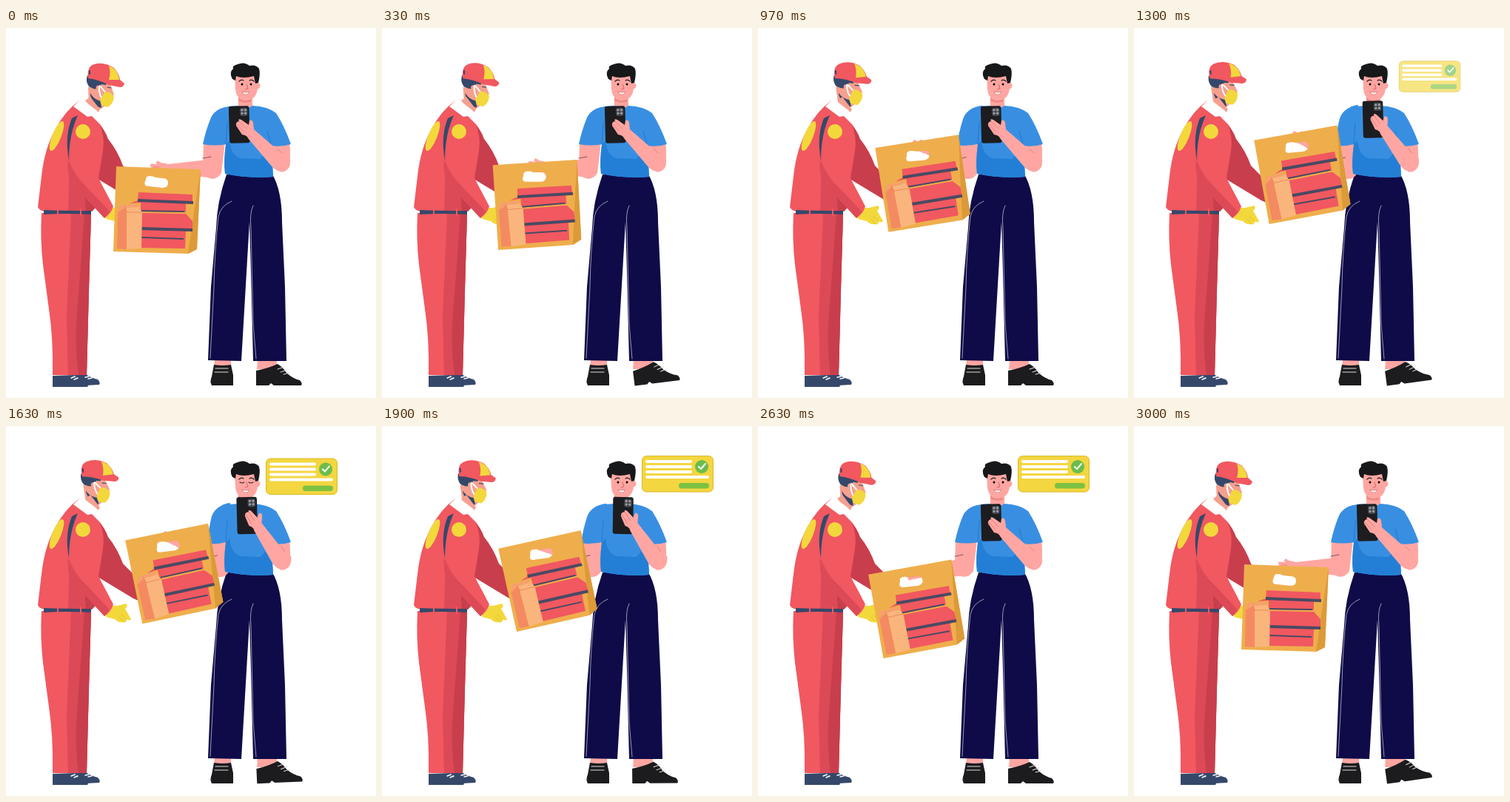
Animation, 500 px wide and 500 px high, one loop 3030 ms. Source, as an HTML page:

```html
<!DOCTYPE html>
<html lang="en">
<head>
<meta charset="utf-8">
<title>Parcel hand-over</title>
<style>
html, body { margin: 0; width: 100%; height: 100%; overflow: hidden; background: #fff; }
svg { display: block; width: 100vw; height: 100vh; }
.red { fill: #f15860; } .mid { fill: #dc4a57; } .deep { fill: #c83e4c; } .navy { fill: #35486a; }
.gold { fill: #f3d83c; } .skin { fill: #ffa6a2; } .face { fill: #f6a08f; } .shirt { fill: #388fe2; }
.pants { fill: #0f0b48; } .black { fill: #1c1c1e; } .white { fill: #fff; }
.line { fill: none; stroke-linecap: round; stroke-linejoin: round; }
</style>
</head>
<body>
<svg viewBox="0 0 500 500">
  <!-- courier -->
  <path class="deep" d="M122 124Q134 138 138 150Q151 166 158 186L184 212L188 240L172 233L124 204Z"/>
  <g id="head">
    <path class="face" d="M111 80L140 73L146 90L136 104L127 110L112 104Z"/>
    <path class="navy" d="M110 64L138 72L135 77L129 76L126 83L118 82L112 79Q107 72 110 64Z"/>
    <path class="navy" d="M114 88Q118 96 128 99L129 108Q118 106 114 91Z"/>
    <circle class="face" cx="125" cy="81" r="3.5"/>
    <path class="line" stroke="#fff" stroke-width="2" d="M126 79Q125 91 132 98M127 78L135 88"/>
    <path class="gold" d="M134 86Q142 86 146 93Q145 103 137 107L129 104Q126 98 129 94Z"/>
    <path class="line" stroke="#35486a" stroke-width="1.2" d="M137 80L142 81"/>
    <path class="red" d="M111 68Q109 52 119 49Q132 45 146 54Q153 62 154 70L160 75Q159 80 154 80L139 77Q126 70 111 68Z"/>
    <path class="gold" d="M139 51Q151 55 153 70L139 70Q142 60 139 51Z"/>
    <path class="line" stroke="#35486a" stroke-width="2" d="M113 58V62"/>
  </g>
  <path class="face" d="M107 98L114 93L127 110L122 118Z"/>
  <path class="navy" d="M63 470L92 469Q98 476 108 477Q113 480 110 485H63Z"/>
  <path class="navy" d="M92 469L108 468Q115 473 124 475Q128 479 126 482L108 483Z"/>
  <path class="line" stroke="#fff" stroke-width="1.5" d="M88 473L93 471M92 475L97 473M107 472L112 471M111 474L116 473"/>
  <path class="red" d="M48 250H115L112 350L109 469H63Q64 420 58 380L50 320Q46 285 48 250Z"/>
  <path class="mid" d="M88 251H115L109 469H84L82 390Z"/>
  <path class="deep" d="M106 251H115L112 350L109 469H98Q93 430 95 400Z"/>
  <path class="red" d="M99 98Q80 112 67 136Q52 163 48 200L43 242Q46 248 52 247H116L124 200Q133 155 126 126Z"/>
  <path class="mid" d="M86 180L84 247H116L122 238Z"/>
  <path class="deep" d="M106 223L122 242L116 248H108Z"/>
  <path class="navy" d="M51 246Q80 247 115 247V252Q80 250 51 252Z"/>
  <path class="line" stroke="#f15860" stroke-width="2" d="M70 245V253M101 245V253"/>
  <ellipse class="gold" cx="68.5" cy="146" rx="6" ry="21.5" transform="rotate(22 68.5 146)"/>
  <path class="gold" d="M135 243L150 243L162 240Q166 243 161 247L169 261Q167 264 163 261Q163 267 157 265Q152 266 147 261L135 258Z"/>
  <path class="line" stroke="#d9ba27" stroke-width=".8" d="M156 255L163 261M153 258L158 264"/>
  <path class="red" d="M96 116Q114 114 126 128Q134 146 131 166L125 203L145 241Q142 251 133 257L88 208Q82 195 85 161Q88 130 96 116Z"/>
  <path class="mid" d="M84 178Q94 202 108 214L140 248L133 257L88 208Q82 195 84 178Z"/>
  <path class="navy" d="M97 118Q85 144 85 179Q79 146 89 122Z"/>
  <circle class="gold" cx="104" cy="140" r="10"/>
  <path class="white" d="M99 98L105 98L122 111L130 121L127 130L116 119L110 120L91 106Z"/>

  <!-- customer -->
  <path class="skin" d="M282 448H304V458H281ZM340 448H366V461H339Z"/>
  <path class="black" d="M281 455Q293 457 304 455L307 469V483H278Q275 478 278 471Z"/>
  <path class="line" stroke="#ddd" stroke-width="1.2" d="M283 460H300M282 465H300"/>
  <g id="foot">
    <path class="black" d="M338 463Q354 460 367 454Q374 458 379 466Q388 474 397 476Q401 480 399 483H362L358 480L355 483H338Z"/>
    <path class="line" stroke="#ddd" stroke-width="1" d="M367 461L376 458M371 465L380 462M375 468L383 466"/>
  </g>
  <path class="pants" d="M298 198H360Q373 220 373 262L377 350L379 450H334L331 330L329 262L318 450L273 449L277 350L284 270Q285 235 298 198Z"/>
  <path class="line" stroke="#a9a8bd" stroke-width=".9" d="M305 234Q290 240 287 255Q282 300 281 350L276 446M334 240Q329 250 331 270L334 400L338 447"/>
  <path class="skin" d="M360 154L383 154Q386 176 381 189L372 195L360 185Z"/>
  <g id="upper">
    <path class="skin" d="M267 154H296L291 196Q285 206 274 203L266 189Z"/>
  </g>
  <path class="skin" id="forearm"/>
  <g id="grip">
    <ellipse class="skin" cx="2" rx="11" ry="6.5"/>
    <path class="line" stroke="#ffa6a2" stroke-width="4.5" d="M0 -2L-13 -3M0 1L-12 1M0 4L-9 5M2 -3L-5 -7"/>
    <path class="line" stroke="#e8736f" stroke-width=".7" d="M-11 -1L-3 -1M-9 3L-2 3"/>
  </g>
  <g id="sleeve">
    <path class="shirt" d="M304 106Q284 107 277 121Q270 138 266 157Q282 160 298 157L306 130Z"/>
    <path class="line" stroke="#7d4a5c" stroke-width=".9" d="M266 176L277 174"/>
  </g>
  <path class="skin" d="M314 90H333V105Q324 113 314 106Z"/>
  <path fill="#f08a87" d="M314 94Q322 101 331 96V100Q320 102 314 98Z"/>
  <path class="shirt" d="M300 106L314 105Q324 112 333 105Q354 106 365 115Q376 132 385 157Q373 161 358 159L361 201Q330 204 296 197Q294 180 297 158L295 115Z"/>
  <path fill="#237fd5" d="M302 152Q304 173 318 176L343 177Q351 172 352 163L360 180L361 201Q330 204 296 197Q294 180 297 158Z"/>
  <path class="line" stroke="#2377c8" stroke-width=".9" d="M299 128L297 157M353 139L359 160"/>
  <circle class="skin" cx="339" cy="78" r="4.5"/>
  <path class="skin" d="M309 65Q323 60 340 65V82Q338 98 324 97Q311 97 310 82Z"/>
  <path fill="#17181a" d="M306 69Q301 60 307 55Q305 51 313 49Q322 45 329 51Q338 49 342 55Q344 62 341 74L337 75L335 65Q320 69 311 65L310 71Z"/>
  <path class="line" stroke="#222" stroke-width="1.2" d="M315 72Q318 69 321 71M329 71Q332 69 335 72"/>
  <g id="open"><circle cx="319" cy="76" r="1.5"/><circle cx="331" cy="76" r="1.5"/></g>
  <path id="shut" class="line" stroke="#222" stroke-width="1.1" d="M316 76Q319 78 322 76M328 76Q331 78 334 76"/>
  <path class="line" stroke="#d9635f" stroke-width="1" d="M325 76L327 82L323 83"/>
  <path class="white" stroke="#c7504f" stroke-width=".6" d="M319 86Q324 88 329 86Q327 91 323 90Q320 89 319 86Z"/>
  <g id="phone">
    <rect x="-13.5" y="-25" width="27.5" height="50" rx="3" fill="#1d1d20"/>
    <rect x="1.5" y="-22.5" width="10.5" height="11" rx="2.5" fill="#45464b"/>
    <path class="line" stroke="#9a9ca2" stroke-width="3.4" d="M4.5 -19.5h0M9 -19.5h0M4.5 -15h0M9 -15h0"/>
  </g>
  <g id="arm">
    <path class="skin" d="M383 174Q387 189 376 194Q367 195 360 188L327 149Q326 145 319 144L311 132Q310 127 315 126Q313 122 318 124L328 131L329 125Q333 123 334 128L335 137L365 163Z"/>
    <path class="line" stroke="#e8736f" stroke-width=".8" d="M315 126L325 136M312 130L321 140M367 163L373 169"/>
  </g>

  <!-- parcel -->
  <g id="bag">
    <path fill="#efae4c" fill-rule="evenodd" d="M149 187L263 191L258 299L246 305L145 302ZM194 200Q189 200 189 205Q184 214 194 214L212 216Q220 215 219 208Q218 203 211 203L202 202Q199 200 194 200Z"/>
    <path fill="#dc9a38" d="M263 191L258 299L246 305L254 250Z"/>
    <path class="red" d="M179 222L252 225V237L243 237V249L182 248V236L167 237L178 233ZM178 249L243 251L252 261V273L243 275L242 298L183 297V262Z"/>
    <path fill="#4a4a63" d="M178 231L253 234V238L178 235ZM182 246L241 247V249L182 248ZM183 269L252 271V275L183 273ZM183 282L240 284V286L183 284Z"/>
    <path class="line" stroke="#efae4c" stroke-width="1.2" d="M183 249.500L244 250.500"/>
    <path fill="#f48a61" d="M151 249L161 240L163 249V299L150 298Z"/>
    <path fill="#fab57c" d="M161 240L179 240L184 249L183 298L163 299V249Z"/>
    <path fill="#f6a06c" d="M154 239L178 238L179 242L161 243L151 249Z"/>
    <path class="line" stroke="#e98256" stroke-width=".8" d="M163 249H184M161 241L163 249"/>
  </g>

  <!-- order confirmation -->
  <g id="note">
    <rect x="351.5" y="43.5" width="96" height="48.500" rx="6" fill="#f3d640" stroke="#d9b92c"/>
    <path class="line" stroke="#fff" stroke-width="4" d="M358 51H417M358 58H417M358 65H417M358 72H440"/>
    <rect x="401" y="80" width="41" height="7.5" rx="3.75" fill="#7cc142"/>
    <circle cx="432" cy="58" r="9" fill="#6bbd4b"/>
    <path class="line" stroke="#fff" stroke-width="2" d="M428 58L431 61L437 54"/>
  </g>
</svg>
<script>
const LOOP = 3030, STEP = 100 / 3, RAD = Math.PI / 180;
const el = Object.fromEntries([...document.querySelectorAll('[id]')].map(e => [e.id, e]));
const move = (id, value) => el[id].setAttribute('transform', value);

// eased 0 to 1 between two times
function ramp(t, from, to) {
  const u = Math.min(1, Math.max(0, (t - from) / (to - from)));
  return u * u * (3 - 2 * u);
}
// up over a-b, held, down over c-d
const hold = (t, a, b, c, d) => ramp(t, a, b) * (1 - ramp(t, c, d));

// one slow rise and fall around the middle of the loop
function swell(t) {
  const u = Math.min(1, Math.abs(t - 1400) / 1400);
  return (1 + Math.cos(Math.PI * u)) / 2;
}

function spin(x, y, deg) {
  const c = Math.cos(deg * RAD), s = Math.sin(deg * RAD);
  return [x * c - y * s, x * s + y * c];
}

// tapered forearm from elbow to hand
function reach(ex, ey, hx, hy) {
  const len = Math.hypot(hx - ex, hy - ey);
  const nx = (ey - hy) / len, ny = (hx - ex) / len;
  const point = (x, y, w) => `${x + nx * w} ${y + ny * w}`;
  el.forearm.setAttribute('d', `M${point(ex, ey, 13)}L${point(hx, hy, 4)}L${point(hx, hy, -5)}L${point(ex, ey, -13)}Z`);
  move('grip', `translate(${hx} ${hy}) rotate(${Math.atan2(ey - hy, ex - hx) / RAD})`);
}

function drawParcel(t) {
  const rise = swell(t) ** 1.5;
  const turn = -(10.5 * ramp(t, 0, 630) + 4.3 * ramp(t, 630, 2170)) * (1 - ramp(t, 2500, 3000));
  const x = 149 + 13.5 * rise;
  const y = 187 - 36 * rise + 14 * hold(t, 1800, 2650, 2630, 3000);
  move('bag', `translate(${x} ${y}) rotate(${turn}) translate(-149 -187)`);

  const shoulder = -8 * hold(t, 630, 1300, 1630, 2170);
  for (const id of ['upper', 'sleeve']) move(id, `rotate(${shoulder} 287 115)`);
  const [ex, ey] = spin(-3, 75, shoulder);
  const [hx, hy] = spin(55, 20, turn);
  reach(284 + ex, 115 + ey, x + hx + 6, y + hy - 18 - turn * 0.75);
}

function draw(t) {
  drawParcel(t);
  const lean = swell(t) ** 0.8;
  move('head', `translate(${-3.5 * lean} ${-lean}) rotate(${-7 * lean} 118 110)`);

  const look = hold(t, 1000, 1450, 2170, 2550);
  move('arm', `rotate(${11 * look} 372 188)`);
  const tilt = 4.5 * look * ramp(t, 1630, 2170) - 1.5;
  move('phone', `translate(${315 + 10.5 * look} ${130.5 - 9.5 * look}) rotate(${tilt})`);

  const tap = Math.sin(Math.PI * t / 240) ** 2;
  move('foot', `translate(${4 * tap} 0) rotate(${-8 * tap} 342 483)`);

  const show = hold(t, 1150, 1400, 2720, 2930);
  const bob = 2 * Math.cos(2 * Math.PI * (t - 2250) / 700) - 1;
  move('note', `translate(400 ${68 + bob}) scale(${0.6 + 0.4 * show}) translate(-400 -68)`);
  el.note.setAttribute('opacity', show);

  const blink = [640, 1640].some(mid => Math.abs(t - mid) < 75);
  el.open.style.display = blink ? 'none' : '';
  el.shut.style.display = blink ? '' : 'none';
}

const start = performance.now();
function tick(now) {
  const t = Math.max(0, now - start) % LOOP;
  draw(Math.floor((t + 3.4) / STEP) * STEP);
  requestAnimationFrame(tick);
}
draw(0);
requestAnimationFrame(tick);
</script>
</body>
</html>
```
